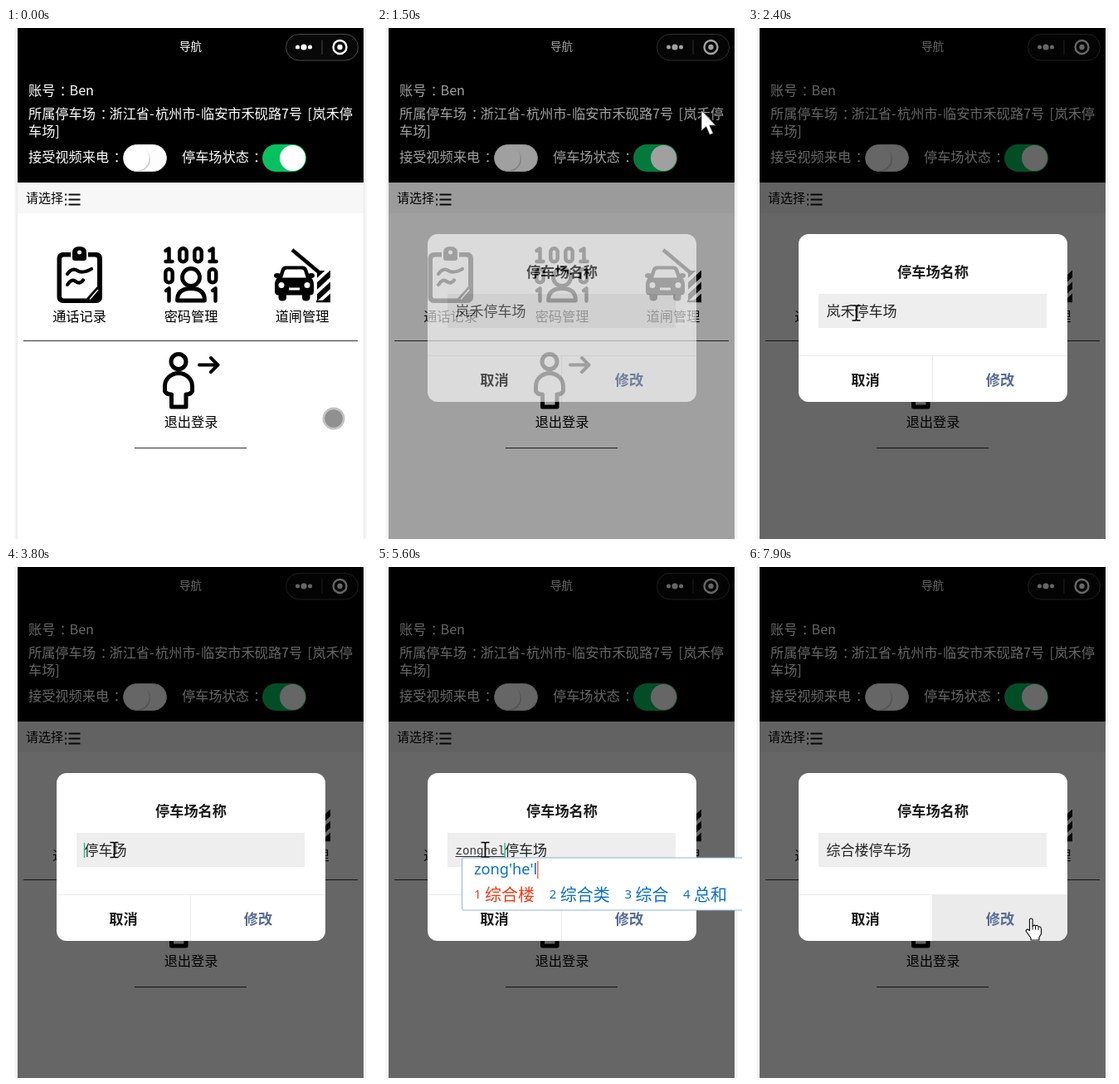
An HTML page that plays this animation: 440x615 px, repeating every 8 s.

```html
<!DOCTYPE html>
<html lang="zh-CN">
<head>
<meta charset="utf-8">
<title>导航</title>
<style>
html, body { margin: 0; width: 100%; height: 100%; overflow: hidden; background: #fff; }
svg { display: block; width: 440px; height: 615px; }
text { font-family: "Noto Sans CJK SC", "Noto Sans CJK", "Noto Sans CJK JP", sans-serif; white-space: pre; }
.mid { text-anchor: middle; }
.head { font-size: 16.2px; font-weight: 500; fill: #fff; }
.label { font-size: 16.2px; text-anchor: middle; fill: #000; }
.bold { font-size: 17.2px; font-weight: 700; text-anchor: middle; fill: #1a1a1a; }
.field { font-size: 17px; font-weight: 300; fill: #222; }
.pinyin { font: 14.2px "Liberation Mono", monospace; fill: #333; }
.ime { font: 18.2px "Noto Sans", "Open Sans", sans-serif; fill: #0a6fca; }
.num { font: 15px "Noto Sans", "Open Sans", sans-serif; }
.word { font-size: 20px; }
.line { fill: none; stroke: #000; stroke-linecap: round; stroke-linejoin: round; }
</style>
</head>
<body>
<svg viewBox="0 0 440 615" xmlns="http://www.w3.org/2000/svg">
  <defs>
    <linearGradient id="edge">
      <stop offset="0" stop-color="#fff"/><stop offset="1" stop-color="#ebebeb"/>
    </linearGradient>
    <path id="one" d="M2.5 5 L6.500 2.500 V18 M2.500 18 H10.500" class="line" stroke-width="4.500"/>
    <path id="bit" d="M3 5 L6.500 2.500 V17.500" class="line" stroke-width="4.500"/>
    <rect id="zero" x="2.300" y="2.300" width="8.400" height="16" rx="4" class="line" stroke-width="4.500"/>
    <clipPath id="post"><rect x="375" y="292" width="16" height="37"/></clipPath>
    <clipPath id="stage"><rect width="440" height="615"/></clipPath>
    <clipPath id="card"><rect x="61" y="248" width="324" height="202" rx="12"/></clipPath>
  </defs>

  <rect width="440" height="615" fill="#fff"/>
  <rect x="9" width="5" height="615" fill="url(#edge)"/>
  <rect x="-436" width="5" height="615" fill="url(#edge)" transform="scale(-1 1)"/>
  <rect x="14" width="417" height="615" fill="#fff"/>

  <!-- header -->
  <rect x="14" width="417" height="186" fill="#000"/>
  <text class="mid" x="222.5" y="26.5" font-size="13.5" fill="#fff">导航</text>
  <rect x="337.5" y="7.5" width="87" height="31.5" rx="15.7" fill="#080808" stroke="#4a4a4a"/>
  <g fill="#fff">
    <circle cx="351.5" cy="23" r="2.5"/><circle cx="359" cy="23" r="3.6"/><circle cx="366.5" cy="23" r="2.5"/>
    <circle cx="402.5" cy="23" r="3.2"/>
  </g>
  <path d="M381 14.5 V32" stroke="#4a4a4a"/>
  <circle cx="402.5" cy="23" r="8" fill="none" stroke="#fff" stroke-width="2.4"/>
  <text class="head" y="81"><tspan x="27">账号</tspan><tspan x="64.5">：</tspan><tspan x="76.5">Ben</tspan></text>
  <text class="head" y="109"><tspan x="27">所属停车场</tspan><tspan x="113.5">：</tspan><tspan x="124.5">浙江省-</tspan><tspan x="180">杭州市-</tspan><tspan x="235">临安市禾砚路7号</tspan><tspan x="363.5">[</tspan><tspan x="369.5">岚禾停</tspan></text>
  <text class="head" x="27" y="130">车场]</text>
  <text class="head" y="161"><tspan x="27">接受视频来电</tspan><tspan x="129.5">：</tspan><tspan x="212">停车场状态</tspan><tspan x="298">：</tspan></text>
  <rect x="141.5" y="140.5" width="52" height="32" rx="16" fill="#fdfdfd" stroke="#dfdfdf"/>
  <circle cx="159" cy="158" r="15" fill="#d2d2d2"/>
  <circle cx="157.3" cy="156.5" r="15.3" fill="#fff"/>
  <rect x="309" y="140" width="53" height="33" rx="16.5" fill="#07c160"/>
  <circle cx="345.5" cy="156.5" r="15.5" fill="#fff"/>

  <!-- picker bar -->
  <rect x="14" y="186" width="417" height="37" fill="#f7f7f7"/>
  <text x="24" y="209.5" font-size="15" fill="#000">请选择</text>
  <path d="M75.5 200.5 H89.5 M75.5 206.5 H89.5 M75.5 212.5 H89.5 M71 200.5 h2 M71 206.5 h2 M71 212.5 h2" stroke="#111" stroke-width="1.8"/>

  <!-- call log -->
  <rect x="61.500" y="270" width="54.500" height="61" rx="7"/>
  <path d="M70 275.500 H107 Q110 275.500 110 278.500 V311 L97 325.500 H70 Q67 325.500 67 322.500 V278.500 Q67 275.500 70 275.500 Z" fill="#fff"/>
  <path d="M101 326.500 L111 315" stroke="#fff" stroke-width="1.500"/>
  <path d="M78 268 H99 V277 Q99 282 94 282 H83 Q78 282 78 277 Z" fill="#fff"/>
  <path d="M80 270 Q80 263 88.500 263 Q97 263 97 270 V277 Q97 280 94 280 H83 Q80 280 80 277 Z"/>
  <circle cx="88.500" cy="270" r="2.500" fill="#fff"/>
  <path class="line" stroke-width="4.200" d="M74 296 Q80 288 86 292 T103 290 M74 309 Q79 301 84 305 T93 303.500"/>
  <text class="label" x="88.500" y="353">通话记录</text>

  <!-- codes -->
  <use href="#one" x="190" y="263"/><use href="#zero" x="207" y="263"/><use href="#zero" x="225" y="263"/><use href="#one" x="243" y="263"/>
  <use href="#zero" x="190" y="288"/><use href="#zero" x="242.500" y="288"/>
  <use href="#bit" x="190" y="311"/><use href="#bit" x="246" y="311"/>
  <circle class="line" cx="223" cy="300" r="10.500" stroke-width="4.800"/>
  <path class="line" stroke-width="4.800" d="M206.500 328 Q206.500 313.500 223 313.500 Q239.500 313.500 239.500 328 Z"/>
  <text class="label" x="223" y="353">密码管理</text>

  <!-- barrier -->
  <path d="M345 267 L382 298" stroke="#000" stroke-width="4.500"/>
  <g clip-path="url(#post)">
    <rect x="375" y="292" width="16" height="37"/>
    <path d="M369 309 L395 285 M369 323 L395 299 M369 337 L395 313" stroke="#fff" stroke-width="4"/>
  </g>
  <path d="M374 329 H391" stroke="#000" stroke-width="2.500"/>
  <path d="M337 286.500 H357.500 Q361.500 286.500 363 290 L366 299 Q371 302 371 309 V317 Q371 321.500 366.500 321.500 V324.500 Q366.500 328.500 361.800 328.500 Q357 328.500 357 324.500 V321.500 H338 V324.500 Q338 328.500 333.200 328.500 Q328.500 328.500 328.500 324.500 V321.500 Q324 321.500 324 317 V309 Q324 302 329 299 L332 290 Q333.500 286.500 337 286.500 Z"/>
  <ellipse cx="327" cy="298" rx="4" ry="3"/><ellipse cx="368" cy="298" rx="4" ry="3"/>
  <path d="M338.500 290.500 H356.500 Q358.500 290.500 359.200 292.500 L361.800 300.500 H333.200 L335.800 292.500 Q336.500 290.500 338.500 290.500 Z M341 312.500 H354 V315.500 H341 Z" fill="#fff"/>
  <circle cx="332" cy="309.500" r="3.500" fill="#fff"/><circle cx="363" cy="309.500" r="3.500" fill="#fff"/>
  <text class="label" x="357" y="353">道闸管理</text>
  <path d="M21 376.500 H424" stroke="#333"/>

  <!-- log out -->
  <circle class="line" cx="208" cy="401.500" r="9" stroke-width="5"/>
  <path class="line" stroke-width="5" d="M191.500 437 V431 A16.500 15.500 0 0 1 224.500 431 V437 Q223 441 217 441 V456 H199.500 V441 Q193 441 191.500 437 Z"/>
  <path class="line" stroke-width="4" d="M233 405.500 H255 M247 397 L255.500 405.500 L247 414"/>
  <text class="label" x="223" y="480">退出登录</text>
  <path d="M155 505.500 H290" stroke="#333"/>

  <rect id="mask" x="14" width="417" height="615" fill="#000"/>
  <g id="modal">
    <g clip-path="url(#card)">
      <rect x="61" y="248" width="324" height="202" fill="#fff"/>
      <rect id="press" x="223" y="394" width="162" height="56" fill="#ebebeb"/>
      <path d="M61 394.500 H385 M222.500 394 V450" stroke="#ececec"/>
    </g>
    <rect x="85" y="320" width="275" height="41" fill="#eee"/>
    <text class="bold" x="223" y="299.500">停车场名称</text>
    <text class="bold" x="141.500" y="430">取消</text>
    <text class="bold" x="304" y="430" style="fill:#576b95">修改</text>
    <text id="value" class="field" y="346.500"></text>
    <text id="typed" class="pinyin" x="94.500" y="345.500"></text>
    <path id="under" stroke="#333"/>
    <rect id="caret" y="332" width="1.400" height="18" fill="#1cc28a"/>
  </g>

  <g id="arrow">
    <path d="M0 0 V25 L5.700 19.800 L10 29.500 L14.300 27.700 L10 18.300 H17.500 Z" fill="#fff" stroke="#222" stroke-width=".8"/>
  </g>
  <g id="beam">
    <path d="M-5 -9 H-1 L0 -8 L1 -9 H5 M0 -8 V8 M-5 9 H-1 L0 8 L1 9 H5" fill="none" stroke="#000" stroke-width="1.600"/>
  </g>
  <g id="hand">
    <path d="M-1.500 1.500 Q0 -.5 2 1.500 V10 Q4 7.500 5.500 9.500 Q8 8 9 10.500 Q12 9.500 12.500 13 V19 L10 23 V26.500 H0 V24 L-6 15.500 Q-5 12 -1.500 15 Z" fill="#fff" stroke="#111" stroke-width="1.200" stroke-linejoin="round"/>
    <path d="M2 10 V14 M5.500 10 V14 M9 11 V14.500" stroke="#111"/>
  </g>
  <g id="dot" opacity=".9">
    <circle r="13.500" fill="#bdbdbd"/><circle r="10.800" fill="#848484"/>
  </g>

  <g id="ime" clip-path="url(#stage)">
    <rect x="102.500" y="350" width="400" height="63" rx="2" fill="#fff" stroke="#8fb4dc"/>
    <text id="pre" class="ime" x="117" y="370"></text>
    <rect id="bar" y="354" width="1.300" height="21" fill="#f0552d"/>
    <g id="words"></g>
  </g>
</svg>
<script>
const $ = id => document.getElementById(id);
const set = (id, attrs) => { for (const k in attrs) $(id).setAttribute(k, attrs[k]); };
const show = (id, on) => set(id, { visibility: on ? 'visible' : 'hidden' });
const LOOP = 8000, STEP = 100, LEFT = 94.5;

// pointer track: time, x, y
const track = [
  [100, 395, 470], [300, 381, 425], [500, 378.5, 270], [800, 390, 94.5], [900, 391, 99],
  [1600, 391, 99], [1800, 330, 165], [2000, 205, 290], [2200, 138, 353], [2300, 133, 348],
  [2400, 130.5, 343], [2600, 130.5, 343], [2700, 130.5, 340.5], [6600, 130.5, 340.5],
  [6700, 150, 330], [6800, 190, 325], [6900, 235, 335], [7000, 280, 362],
  [7100, 315, 396], [7200, 335, 415], [7300, 341, 422.5]
];

// field content: time, committed text, caret index
const values = [
  [0, '岚禾停车场', 2], [3500, '岚停车场', 1], [3700, '停车场', 0], [6500, '综合楼停车场', 3]
];

// composition: time, grouped pinyin, candidates
const typing = [
  [4100, 'z', '在 中 这 总 张 做'],
  [4200, 'zo', '总 走 做 作 坐 左'],
  [4300, 'zon', '总 宗 纵 综 踪 棕'],
  [4400, 'zong', '总 宗 纵 综 踪 棕'],
  [4500, "zong'h", '综合 总会 总和 纵横 总行'],
  [5200, "zong'he", '综合 总和 总合 纵合 棕褐'],
  [5600, "zong'he'l", '综合楼 综合类 综合 总和 总'],
  [5800, "zong'he'lo", '综合楼 综合 总和 总合 总'],
  [6000, "zong'he'lou", '综合楼 综合 总和 总合 总'],
  [6500, '', '']
];

const caretTimes = [[3300, 3700], [3800, 7000], [7600, 7800]];
const latest = (list, t) => list.filter(row => row[0] <= t).pop();

function pointer(t) {
  const i = track.findIndex(p => p[0] > t);
  if (i === 0) return track[0].slice(1);
  if (i < 0) return track[track.length - 1].slice(1);
  const [a, b] = [track[i - 1], track[i]], k = (t - a[0]) / (b[0] - a[0]);
  return [a[1] + (b[1] - a[1]) * k, a[2] + (b[2] - a[2]) * k];
}

function cursorKind(t, x, y) {
  if (t < 1400) return 'dot';
  if (x > 85 && x < 360 && y > 320 && y < 361) return 'beam';
  return t > 2200 && x > 222 && y > 394 ? 'hand' : 'arrow';
}

function drawWords(list) {
  let x = 117, out = '';
  list.split(' ').forEach((w, i) => {
    const color = i ? '#0a6fca' : '#f03a14';
    out += `<text class="num" x="${x}" y="399" fill="${color}">${i + 1}</text>` +
      `<text class="word" x="${x + 13}" y="401.5" fill="${color}">${w}</text>`;
    x += 30.7 + 20 * w.length;
  });
  $('words').innerHTML = out;
}

let last = -1;
function draw(t) {
  const p = Math.min(1, Math.max(0, (t - 1400) / 300));
  const fade = 1 - Math.pow(1 - p, 2.4);
  set('mask', { opacity: 0.6 * fade });
  set('modal', { opacity: fade });

  const [, text, index] = latest(values, t);
  const [, pre, words] = latest(typing, t) || [0, '', ''];
  const raw = pre.replace(/'/g, ''), width = raw.length * 8.52;
  $('typed').textContent = raw;
  $('value').textContent = text;
  set('value', { x: LEFT + width });
  set('under', { d: raw ? `M${LEFT} 348.5 h${width}` : '' });
  set('caret', { x: LEFT - 0.7 + width + index * 17 });
  show('caret', caretTimes.some(([a, b]) => t >= a && t < b));
  show('press', t >= 7800);

  show('ime', !!pre);
  if (pre) {
    $('pre').textContent = pre;
    set('bar', { x: 117 + $('pre').getComputedTextLength() });
    drawWords(words);
  }

  const [x, y] = pointer(t), kind = cursorKind(t, x, y);
  for (const id of ['dot', 'arrow', 'beam', 'hand']) show(id, id === kind);
  set(kind, { transform: `translate(${x} ${y})` });
}

function tick() {
  const t = Math.floor(performance.now() % LOOP / STEP) * STEP;
  if (t !== last) draw(last = t);
  requestAnimationFrame(tick);
}
tick();
</script>
</body>
</html>
```
